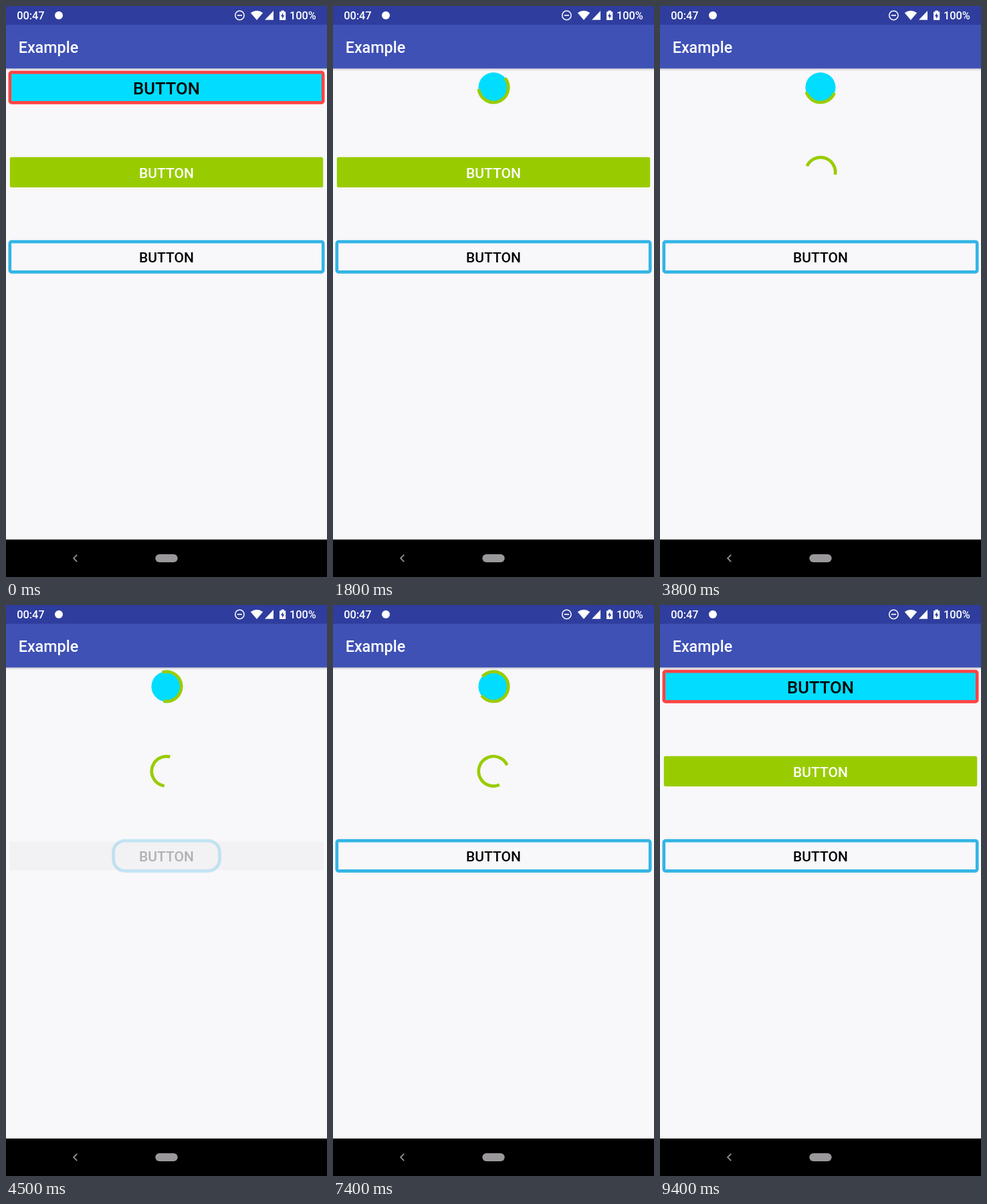
Animation of 480 by 853 pixels, one loop 9.5 s. Source, as an HTML page:

```html
<!DOCTYPE html>
<html lang="en">
<head>
<meta charset="utf-8">
<title>Loading buttons</title>
<style>
  html, body { margin: 0; width: 100%; height: 100%; overflow: hidden; background: #f8f7fa; }
  svg { display: block; width: 100%; height: 100%; }
  text { font-family: Roboto, sans-serif; font-weight: 500; fill: #fff; }
</style>
</head>
<body>
<svg id="stage" viewBox="0 0 480 853">
  <defs>
    <linearGradient id="shade" x2="0" y2="1">
      <stop stop-opacity=".2"/>
      <stop offset="1" stop-opacity="0"/>
    </linearGradient>
  </defs>
  <rect width="480" height="853" fill="#f8f7fa"/>
  <g id="buttons"></g>

  <!-- app bar and status bar -->
  <rect y="93" width="480" height="4" fill="url(#shade)"/>
  <rect width="480" height="93.3" fill="#3f51b5"/>
  <rect width="480" height="28" fill="#2f3e9e"/>
  <text x="18.7" y="69.8" font-size="23.33">Example</text>
  <text x="16.2" y="20.2" font-size="16.33">00:47</text>
  <text x="463.8" y="20.2" font-size="16.33" text-anchor="end">100%</text>
  <g fill="#fff">
    <circle cx="79" cy="14" r="6"/>
    <circle cx="349.4" cy="14" r="6.7" fill="none" stroke="#fff" stroke-width="1.5"/>
    <rect x="345.8" y="13.2" width="7.2" height="1.6"/>
    <path d="M365.8 10.2Q375 3.6 384.2 10.2L375 21Z"/>
    <path d="M387 20.7L400 7.2V20.7Z"/>
    <path d="M409 8.6h2.6V6.8h4.2v1.8h2.4V21H409Z"/>
  </g>
  <path d="M414.2 10.2l-3.3 5.2h2.2v3.8l3.3-5.4h-2.2Z" fill="#2f3e9e"/>

  <!-- navigation bar -->
  <rect y="797" width="480" height="56"/>
  <path d="M106.3 819.8l-5.2 5.2 5.2 5.2" fill="none" stroke="#999" stroke-width="1.7"/>
  <rect x="223.3" y="819" width="33.4" height="12" rx="6" fill="#9a989b"/>
</svg>
<script>
const LOOP = 9500, STEP = 100;
const MORPH = 300, SWEEP = 677, TURN = 1976;
const CX = 240, WIDE = 468.4, HIGH = 45.2, RADIUS = 22.2, LINE = 4.67;
const GREEN = '#99cc00', BLUE = '#33b5e5';

const specs = [
  { y: 121.8, fill: '#00ddff', border: '#ff4444', ink: '#000', size: 25.67, base: 132, from: 1220, to: 8910, spin: GREEN, solid: true },
  { y: 248.3, fill: GREEN, border: 'none', ink: '#fff', size: 21, base: 256.5, from: 2618, to: 7600, spin: GREEN },
  { y: 374.7, fill: 'none', border: BLUE, ink: '#000', size: 21, base: 382.7, from: 4304, to: 6600, spin: BLUE, lag: 44 }
];

function add(parent, tag, attrs) {
  const el = document.createElementNS('http://www.w3.org/2000/svg', tag);
  set(el, attrs);
  return parent.appendChild(el);
}

function set(el, attrs) {
  for (const key in attrs) el.setAttribute(key, attrs[key]);
}

const clamp = x => Math.min(1, Math.max(0, x));
const smooth = x => (1 - Math.cos(Math.PI * clamp(x))) / 2;
const slow = x => 1 - (1 - x) ** 2;

function build(spec) {
  const g = add(document.getElementById('buttons'), 'g', {});
  const box = { y: spec.y - HIGH / 2, height: HIGH };
  const ripple = add(g, 'rect', { x: 5, y: spec.y - 21.3, width: 470, height: 42.6 });
  const face = add(g, 'rect', { ...box, fill: spec.fill });
  const border = add(g, 'rect', { ...box, fill: 'none', stroke: spec.border, 'stroke-width': LINE });
  const label = add(g, 'text', { x: CX, y: spec.base, 'font-size': spec.size, 'text-anchor': 'middle' });
  label.style.fill = spec.ink;
  label.textContent = 'BUTTON';
  const arc = add(g, 'path', { fill: 'none', stroke: spec.spin, 'stroke-width': LINE });
  return { ...spec, ripple, face, border, label, arc };
}

function arcPath(cy, start, sweep) {
  const at = deg => {
    const a = deg * Math.PI / 180;
    return `${CX + RADIUS * Math.cos(a)} ${cy + RADIUS * Math.sin(a)}`;
  };
  return `M${at(start)}A${RADIUS} ${RADIUS} 0 ${sweep > 180 ? 1 : 0} 1 ${at(start + sweep)}`;
}

// The arc grows, then its tail catches up while the whole ring turns.
function spinner(cy, time) {
  const cycle = Math.floor(time / SWEEP);
  const f = slow(time / SWEEP - cycle);
  const shrinking = cycle % 2 === 1;
  const turn = 360 * time / TURN - 90 - 100 * Math.floor(cycle / 2);
  return shrinking
    ? arcPath(cy, turn + 260 * f, 310 - 282 * f)
    : arcPath(cy, turn, 28 + 282 * f);
}

function draw(b, t) {
  const closing = smooth((t - b.from) / MORPH);
  const f = closing - smooth((t - b.to) / MORPH);
  const width = WIDE + (HIGH - WIDE) * f;
  const shape = { x: CX - width / 2, width, rx: 2.5 + (HIGH / 2 - 2.5) * f };
  set(b.face, { ...shape, opacity: b.solid ? 1 : 1 - f });
  set(b.border, { ...shape, opacity: 1 - f });
  set(b.label, { opacity: 1 - f });
  set(b.ripple, { opacity: t > b.from && t < b.to ? 0.09 * (1 - f) : 0 });

  const time = t - b.from - MORPH - (b.lag || 0);
  set(b.arc, { d: time >= 0 && t < b.to ? spinner(b.y, time) : '' });
}

const buttons = specs.map(build);
const begin = performance.now();

function tick() {
  const now = (performance.now() - begin + 8) % LOOP;
  const t = Math.floor(now / STEP) * STEP;
  buttons.forEach(b => draw(b, t));
  requestAnimationFrame(tick);
}
tick();
</script>
</body>
</html>
```
